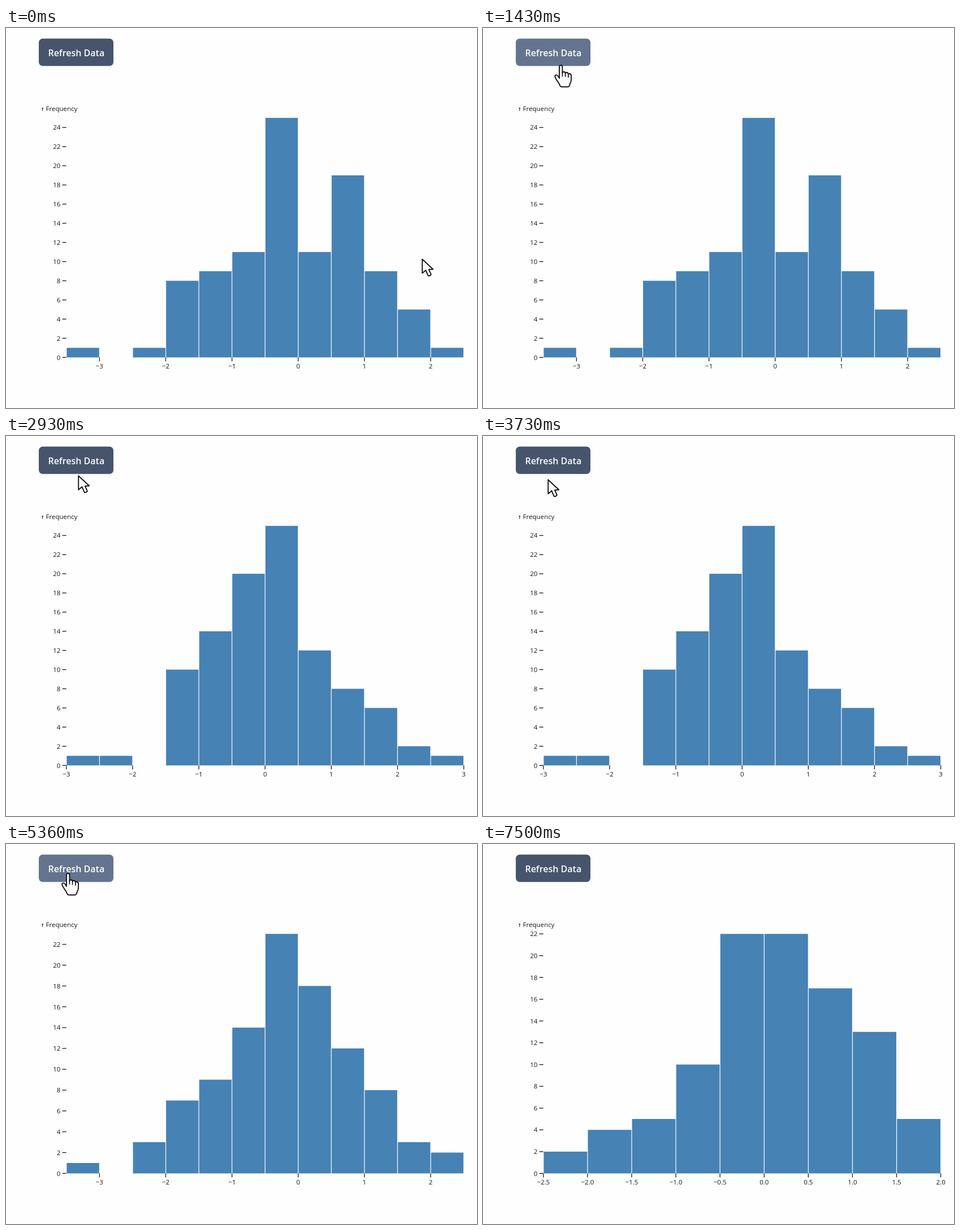
Write an HTML page with a canvas that moves like this. It is 833 by 673 pixels and loops after 9260 ms.

```html
<!DOCTYPE html>
<html lang="en">
<head>
<meta charset="utf-8">
<title>Histogram</title>
<style>
  html, body { margin: 0; width: 100%; height: 100%; overflow: hidden; background: #fefefe; }
  canvas { display: block; width: 833px; height: 673px; }
</style>
</head>
<body>
<canvas id="stage"></canvas>
<script>
const W = 833, H = 673, LOOP = 9260;
const LEFT = 106.8, RIGHT = 809.6, TOP = 159.2, BASE = 583.4;
const SANS = '"Open Sans", "Noto Sans", sans-serif';

const canvas = document.getElementById('stage');
const ctx = canvas.getContext('2d');
const dpr = window.devicePixelRatio || 1;
canvas.width = W * dpr;
canvas.height = H * dpr;

// Bins are half a unit wide, beginning at `min`.
const charts = [
  { from: 0, min: -3.5, counts: [1, 0, 1, 8, 9, 11, 25, 11, 19, 9, 5, 1] },
  { from: 2800, min: -3, counts: [1, 1, 0, 10, 14, 20, 25, 12, 8, 6, 2, 1] },
  { from: 4530, min: -3, counts: [1, 5, 2, 11, 15, 26, 16, 11, 8, 3, 2] },
  { from: 5360, min: -3.5, counts: [1, 0, 3, 7, 9, 14, 23, 18, 12, 8, 3, 2] },
  { from: 6030, min: -2.5, counts: [2, 1, 11, 15, 20, 18, 19, 7, 4, 3] },
  { from: 6830, min: -2.5, counts: [2, 4, 5, 10, 22, 22, 17, 13, 5] }
];

const lerp = (a, b, u) => a + (b - a) * u;
const smooth = u => u * u * (3 - 2 * u);
const easeOut = (u, p) => 1 - Math.pow(1 - u, p);

const glide = u => lerp(u, smooth(u), 0.4);
const moves = [
  { from: 130, to: 1030, a: [735, 408], b: [171, 120], ex: glide, ey: u => Math.pow(glide(u), 1.38) },
  { from: 1030, to: 2030, a: [171, 120], b: [127, 50], ex: u => easeOut(u, 3), ey: u => easeOut(u, 3) },
  { from: 2780, to: 3260, a: [127, 50], b: [118, 97], ex: u => u * u * u, ey: u => easeOut(u, 1.4) },
  { from: 3440, to: 4060, a: [118, 97], b: [109, 51], ex: smooth, ey: smooth },
  { from: 7330, to: 7465, a: [109, 51], b: [34, 64], ex: u => u, ey: u => u }
];

function pointerAt(t) {
  if (t >= 7500) return null;
  let pos = moves[0].a;
  for (const m of moves) {
    if (t < m.from) break;
    const u = Math.min(1, (t - m.from) / (m.to - m.from));
    pos = [lerp(m.a[0], m.b[0], m.ex(u)), lerp(m.a[1], m.b[1], m.ey(u))];
  }
  return { x: Math.round(pos[0]), y: Math.round(pos[1]) };
}

function text(str, x, y, align, font, color) {
  ctx.font = font;
  ctx.textAlign = align;
  ctx.fillStyle = color;
  ctx.fillText(str, x, y);
}

function label(str, x, y, align) {
  text(str, x, y, align, '11.5px ' + SANS, '#161616');
}

function line(x1, y1, x2, y2) {
  ctx.beginPath();
  ctx.moveTo(x1, y1);
  ctx.lineTo(x2, y2);
  ctx.stroke();
}

function drawButton(hover) {
  ctx.fillStyle = hover ? '#64748e' : '#46556b';
  ctx.beginPath();
  ctx.roundRect(58, 18.7, 132, 48.6, 7);
  ctx.fill();
  text('Refresh Data', 124.3, 50, 'center', '600 16px ' + SANS, '#fff');
}

function drawChart({ min, counts }) {
  const max = Math.max(...counts);
  const span = counts.length / 2;
  const xAt = v => LEFT + (v - min) / span * (RIGHT - LEFT);
  const yAt = n => BASE - n / max * (BASE - TOP);

  ctx.fillStyle = '#4682b4';
  counts.forEach((n, i) => {
    const x = xAt(min + i / 2), end = xAt(min + (i + 1) / 2);
    ctx.fillRect(x + 0.6, yAt(n), end - x - 1.2, BASE - yAt(n));
  });

  ctx.strokeStyle = '#161616';
  ctx.lineWidth = 1.3;
  for (let n = 0; n <= max; n += 2) {
    const y = yAt(n);
    line(99.5, y, 106.6, y);
    label(String(n), 96.3, y + 4.2, 'right');
  }

  const fine = span <= 5, step = fine ? 0.5 : 1;
  for (let v = Math.ceil(min / step) * step; v <= min + span; v += step) {
    const x = xAt(v);
    line(x, BASE, x, BASE + 7);
    const digits = Math.abs(v).toFixed(fine ? 1 : 0);
    label((v < 0 ? '\u2212' : '') + digits, x, 603.4, 'center');
  }

  text('\u2191', 61.3, 147, 'left', '11.5px "DejaVu Sans Mono", monospace', '#161616');
  label('Frequency', 70.6, 147, 'left');
}

const arrow = new Path2D('M1.2 1.5V26.2L7.4 21L11.2 29.8Q12 31.6 13.8 30.9L15.4 30.2Q17.2 29.3 16.4 27.4L12.8 19.8L20.2 19.2Z');

// Drawn relative to the fingertip.
const hand = new Path2D('M-2 24V4Q-2 1 .6 1Q3.4 1 3.4 4V15Q3.6 12.4 6 12.5Q8.5 12.6 8.6 15.5' +
  'Q9 13.6 11.2 13.8Q13.6 14 13.8 17Q14.4 15.6 16.4 16Q19 16.6 19 19.5V27Q19 30 17 33.5' +
  'Q16 35.5 15.6 37.5Q15 39.2 13 39.2H2Q0 39.2-.8 37.2Q-2.6 32.6-5.4 29.2Q-7.6 26.4-9.4 22.2' +
  'Q-10.6 19.4-8.6 18.4Q-6.4 17.4-4.4 20Z');
const creases = new Path2D('M3.4 14V20.5M8.6 15V21M13.8 17V22.5');

function drawPointer({ x, y }, hover) {
  ctx.save();
  ctx.translate(x, y);
  ctx.lineJoin = ctx.lineCap = 'round';
  ctx.lineWidth = 1.9;
  ctx.fillStyle = '#fefefe';
  ctx.strokeStyle = '#151515';
  const shape = hover ? hand : arrow;
  ctx.fill(shape);
  ctx.stroke(shape);
  if (hover) {
    ctx.lineWidth = 1.6;
    ctx.stroke(creases);
  }
  ctx.restore();
}

function draw(now) {
  const t = now % LOOP;
  const pointer = pointerAt(t);
  const hover = !!pointer && pointer.x >= 58 && pointer.x <= 190 && pointer.y <= 68;

  ctx.setTransform(dpr, 0, 0, dpr, 0, 0);
  ctx.fillStyle = '#fefefe';
  ctx.fillRect(0, 0, W, H);
  drawButton(hover);
  drawChart(charts.filter(c => t >= c.from).pop());
  if (pointer) drawPointer(pointer, hover);
}

let start;
function tick(now) {
  if (start === undefined) start = now;
  draw(Math.max(0, now - start));
  requestAnimationFrame(tick);
}
draw(0);
requestAnimationFrame(tick);
</script>
</body>
</html>
```
